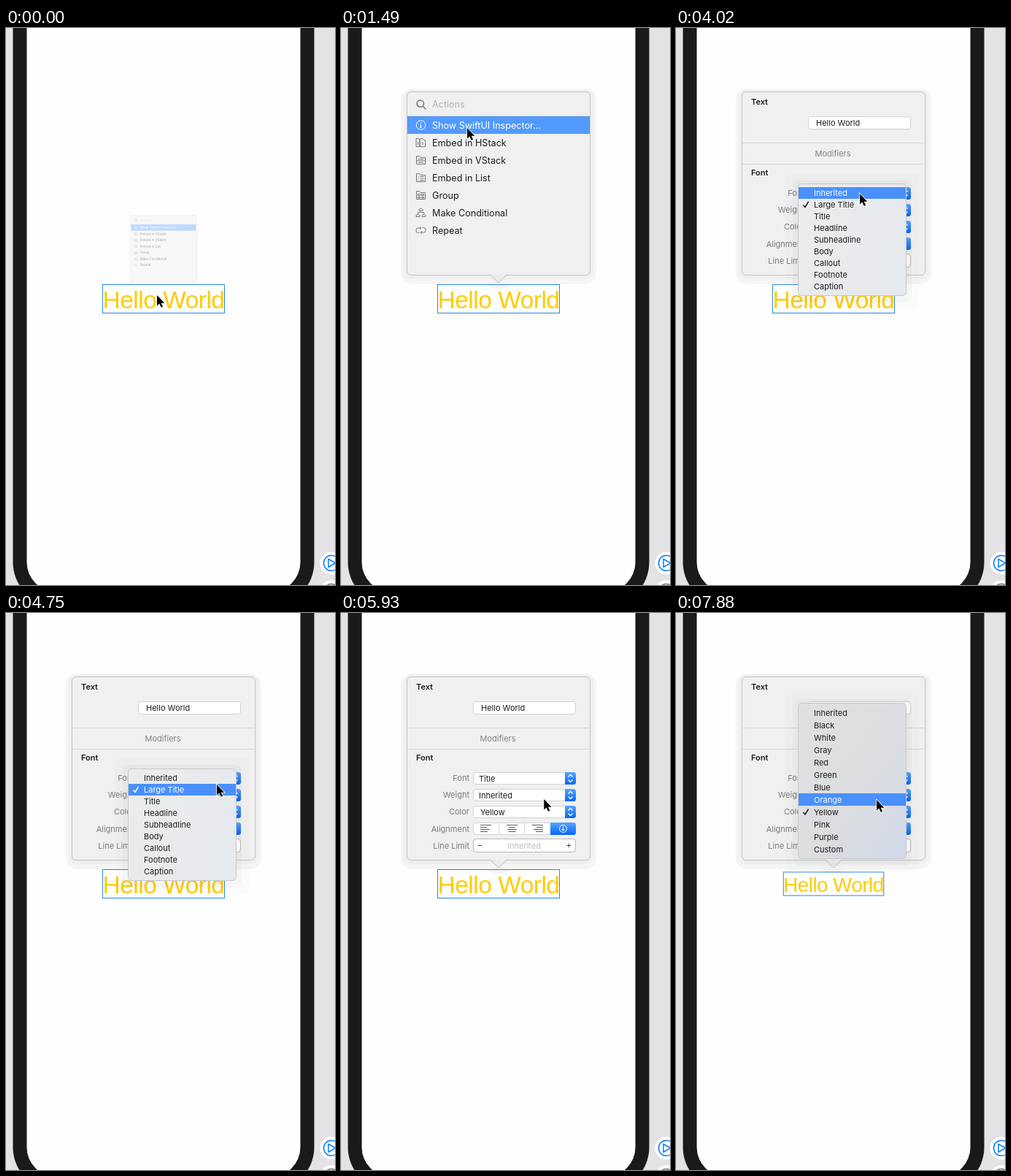
These frames come from a looping animation (451 px wide and 763 px high, 8 s). An HTML page:

```html
<!DOCTYPE html>
<html lang="en">
<head>
<meta charset="utf-8">
<title>Inspector popover</title>
<style>
  html, body { margin: 0; width: 100%; height: 100%; overflow: hidden; background: #e3e3e5; }
  svg { display: block; width: 100vw; height: 100vh; }
  text { font-family: Inter, "Open Sans", sans-serif; font-size: 11px; fill: #1c1c1c; }
  .action { font-size: 12.6px; }
  .title { font-family: "Liberation Sans", Arial, sans-serif; fill: #ffcc00; letter-spacing: -.015em; }
  .label { fill: #7b7b7b; text-anchor: end; }
  .bold { font-weight: 600; }
  .mid { text-anchor: middle; }
</style>
</head>
<body>
<svg id="stage" viewBox="0 0 451 763">
  <defs>
    <linearGradient id="blue" x2="0" y2="1">
      <stop stop-color="#58a4ff"/><stop offset="1" stop-color="#0666f4"/>
    </linearGradient>
    <linearGradient id="fontMenu" x2="1" y2=".35">
      <stop stop-color="#ececec"/><stop offset="1" stop-color="#e6e9ee"/>
    </linearGradient>
    <linearGradient id="colorMenu" x2="1" y2="1">
      <stop stop-color="#dfe0e1"/><stop offset=".6" stop-color="#dbdde0"/><stop offset="1" stop-color="#d0daea"/>
    </linearGradient>
  </defs>
  <rect x="9.5" y="-80" width="413" height="870.5" rx="58.5" fill="#1a1a1a"/>
  <rect x="28.5" y="-80" width="375" height="852" rx="40" fill="#fefefe"/>
  <g fill="#fff">
    <circle cx="446" cy="733" r="15.5"/><circle cx="446" cy="772" r="15.5"/>
  </g>
  <g fill="none" stroke-width="1.5">
    <path d="M442 727.5v11l9.5-5.5z" stroke="#0a7aff" stroke-linejoin="round"/>
    <circle cx="446" cy="733" r="10.5" stroke="#0a7aff"/>
    <circle cx="446" cy="772" r="10.5" stroke="#777"/>
  </g>
  <g id="scene"></g>
</svg>
<script>
const scene = document.getElementById('scene');
const LOOP = 8000, TICKS = 54, ACCENT = '#529aff';

// Ticks at which the interface changes state
const INSPECT = 12, OPEN_FONTS = 27, PICK_FONT = 39, RESIZE = 42, OPEN_COLORS = 46;

// Pointer waypoints: [tick, x, y]
const path = [
  [0, 207, 366], [4, 200, 216], [5, 185, 166], [6, 185, 166], [10, 173, 137],
  [17, 173, 137], [19, 194, 160], [23, 252, 227], [28, 252, 227], [32, 289, 235], [34, 288, 228],
  [37, 279, 255], [41, 278, 255], [45, 275, 271], [50, 275, 271], [53, 275, 256]
];

function pointer(tick) {
  const next = Math.max(1, path.findIndex(p => p[0] >= tick));
  const [a, ax, ay] = path[next - 1], [b, bx, by] = path[next];
  const p = Math.max(0, (tick - a) / (b - a));
  return [ax + (bx - ax) * p, ay + (by - ay) * p];
}

const clamp = v => Math.min(1, Math.max(0, v));
const rect = (x, y, w, h, fill, more = '') =>
  `<rect x="${x}" y="${y}" width="${w}" height="${h}" fill="${fill}" ${more}/>`;
const line = (d, color, more = '') => `<path d="${d}" fill="none" stroke="${color}" ${more}/>`;
const text = (x, y, str, cls = '', more = '') => `<text x="${x}" y="${y}" class="${cls}" ${more}>${str}</text>`;
const group = (content, more) => `<g ${more}>${content}</g>`;

// Path pieces
const box = (x, y, w, h) => `M${x} ${y}h${w}v${h}h${-w}z`;
const ring = (x, y, r) => `M${x - r} ${y}a${r} ${r} 0 1 0 ${2 * r} 0a${r} ${r} 0 1 0 ${-2 * r} 0`;
const house = (x, y) => `M${x - 2.5} ${y}v-2l2.5-1.5 2.5 1.5v2z`;
const endCap = (x, y) => `<path d="M${x} ${y}h${318.5 - x}q3.5 0 3.5 3.5v10q0 3.5-3.5 3.5H${x}z" fill="url(#blue)"/>`;
const folder = 'M-6 5.5v-11h4l1.5 2h6.5v9z';
const loopArrow = 'M2-3.5h2a2.5 2.5 0 0 1 2.5 2.5v1.5a2.5 2.5 0 0 1-2.5 2.5h-4.5M1.5 5l-2-2 2-2';

const actions = [
  ['Show SwiftUI Inspector...', ring(0, 0, 6.3) + 'M0-3.4v1.3M-1-.8h1v4M-1.4 3.3h2.8'],
  ['Embed in HStack', 'M-6.5 5.5v-11h3.5l1.5 2v9zM-1.5 5.5v-11h4l1.5 2h2v9zM-4-1v4M2.5-1v4'],
  ['Embed in VStack', folder + 'M-6 .8h12.5M-3.5-1.4h7M-3.5 3.2h7'],
  ['Embed in List', folder + [-1.5, 1, 3.5].map(y => `M-4 ${y}h1M-1 ${y}h5`).join('')],
  ['Group', folder + [-4, 1].map(x => box(x, -1.5, 3, 2) + box(x, 2.5, 3, 1.5)).join('')],
  ['Make Conditional', house(0, -2.5) + house(-4, 5.5) + house(4, 5.5) + 'M-4 2v-2.5h8v2.5'],
  ['Repeat', loopArrow]
];
const menus = {
  font: { top: 213, step: 16, pad: 5, checked: 1, items:
    'Inherited,Large Title,Title,Headline,Subheadline,Body,Callout,Footnote,Caption'.split(',') },
  color: { top: 123, step: 17, pad: 5, checked: 8, items:
    'Inherited,Black,White,Gray,Red,Green,Blue,Orange,Yellow,Pink,Purple,Custom'.split(',') }
};

function shell() {
  return rect(82, 83, 268, 268, '#f5f5f5', 'rx="15"') + rect(86, 85, 260, 259, '#efefef', 'rx="10"') +
    '<ellipse cx="216" cy="350" rx="15" ry="7" fill="#f3f3f3"/>' +
    rect(90.5, 87.5, 251, 251, '#f0f0f0', 'rx="5.5" stroke="#c2c2c2"') +
    '<path d="M203 338q2 0 4 2l7.500 8q1.500 1.500 3 0l7.500-8q2-2 4-2" fill="#ebebeb" stroke="#c2c2c2"/>';
}

function actionList(selected) {
  const rows = actions.map(([name, icon], i) => {
    const y = 133 + 24 * i, on = i === selected, at = `transform="translate(109.5 ${y})"`;
    const color = on ? '#fff' : '#777';
    return (on ? rect(91, y - 12, 250, 24, ACCENT) : '') + line(icon, color, at) +
      (icon === loopArrow ? line(icon, color, at.replace(')', ') rotate(180)')) : '') +
      text(125, y + 4.6, name, 'action', on ? 'style="fill:#fff"' : '');
  });
  return line(ring(108.7, 103.5, 4.7) + 'M112 107l4.3 4.2', '#666', 'stroke-width="1.3"') +
    text(125, 109, 'Actions', 'action', 'style="fill:#b3b3b3"') +
    line('M91 120.5h250', '#d5d5d5') + rows.join('');
}

const field = (y, h, border = '#d2d2d2') => rect(181.5, y, 140, h, '#fff', `rx="3.5" stroke="${border}"`);

function picker(y, label, value, x = 189) {
  return text(176, y + 3.7, label, 'label') + field(y - 8, 16) + endCap(307, y - 8.5) +
    line(`M311.5 ${y - 2}l3-3 3 3M311.5 ${y + 2}l3 3 3-3`, '#fff', 'stroke-width="1.3"') +
    text(x, y + 4, value);
}

function alignBars(x, anchor) {
  return [15, 9, 13, 10].map((w, i) =>
    line(`M${x + (15 - w) * anchor} ${290.5 + 3 * i}h${w}`, '#5a5a5a')).join('');
}

function inspector(font) {
  return text(103, 105, 'Text', 'bold') + field(121.5, 17) + text(192, 134, 'Hello World') +
    line('M91 157.5h249M91 186.5h249', '#d6d6d6') +
    text(215, 176, 'Modifiers', 'mid', 'style="fill:#808080"') +
    text(103, 202, 'Font', 'bold') +
    picker(226.5, 'Font', font) + picker(249.5, 'Weight', 'Inherited') + picker(272.5, 'Color', 'Yellow', 191) +
    text(176, 299.5, 'Alignment', 'label') + field(287.5, 16) +
    line('M216.5 287v17M251.5 287v17', '#d8d8d8') +
    alignBars(191, 0) + alignBars(227, .5) + alignBars(262, 1) + endCap(287, 287) +
    line(ring(304.5, 295.5, 5) + 'M304.5 292.5v5.5M302.3 296l2.2 2.2 2.2-2.2', '#fff') +
    text(176, 322.5, 'Line Limit', 'label') + field(309.5, 18, '#b8b8b8') +
    line('M188 318.5h5M309.5 318.5h5.5M312.25 315.75v5.5', '#444') +
    text(251, 323, 'Inherited', 'mid', 'style="fill:#bdbdbd"');
}

function dropdown(name, pointerY) {
  const { top, step, pad, checked, items } = menus[name];
  const height = step * items.length + 2 * pad;
  const selected = Math.floor((pointerY - top - pad) / step);
  const rows = items.map((item, i) => {
    const y = top + pad + step * (i + .5), on = i === selected, ink = on ? '#fff' : '#1c1c1c';
    return (on ? rect(168, y - step / 2, 147, step, '#4a90fb') : '') +
      (i === checked ? line(`M174.5 ${y + .5}l2.5 3 4.5-7.5`, ink, 'stroke-width="1.5"') : '') +
      text(189, y + 4.2, item, '', `style="fill:${ink}"`);
  });
  return rect(150, top - 14, 183, height + 31, '#000', 'opacity=".012" rx="3"') +
    rect(160, top - 5, 163, height + 14, '#000', 'opacity=".025" rx="9"') +
    rect(167.5, top + .5, 148, height - 1, `url(#${name}Menu)`, 'rx="5" stroke="#c8c8ca"') + rows.join('');
}

function title(k) {
  const w = 167 * k, h = 39 * k, size = 33.5 * k;
  return rect(216 - w / 2, 371 - h / 2, w, h, 'none', 'stroke="#2b87dc"') +
    text(216, 371.2 + .375 * size, 'Hello World', 'title mid', `style="font-size:${size}px"`);
}

function draw(tick) {
  const [x, y] = pointer(tick);
  const scale = 1 - .644 * (-.125) ** tick; // springs open with a small overshoot
  const shown = clamp((tick - INSPECT) / 4);
  // The hover highlight trails the pointer slightly
  const hover = Math.floor((pointer(tick - .75)[1] - 121) / 24);
  const list = shown < 1 ? group(actionList(actions[hover] ? hover : 0), `opacity="${1 - shown}"`) : '';
  const panel = shown ? group(inspector(tick < PICK_FONT ? 'Large Title' : 'Title'), `opacity="${shown}"`) : '';
  const menu = tick >= OPEN_COLORS ? 'color' : tick >= OPEN_FONTS && tick <= PICK_FONT ? 'font' : '';
  return group(shell() + list + panel,
      `opacity="${clamp(.37 + tick)}" transform="translate(216 351) scale(${scale}) translate(-216 -351)"`) +
    title(tick < RESIZE ? 1 : 28 / 34) +
    (menu ? group(dropdown(menu, y), `opacity="${tick === PICK_FONT ? .45 : 1}"`) : '') +
    `<path d="M0 0v14.5l3.3-3 2.4 5.3 2.4-1.1-2.4-5h4.6z" transform="translate(${x} ${y})"
      stroke="#fff" stroke-width="1.6" paint-order="stroke"/>`;
}

let last = -1;
function frame() {
  // A few ms of lead absorbs the rounding of the tick times
  const tick = Math.min(TICKS - 1, Math.floor((performance.now() % LOOP + 8) / LOOP * TICKS));
  if (tick !== last) scene.innerHTML = draw(last = tick);
  requestAnimationFrame(frame);
}
frame();
</script>
</body>
</html>
```
